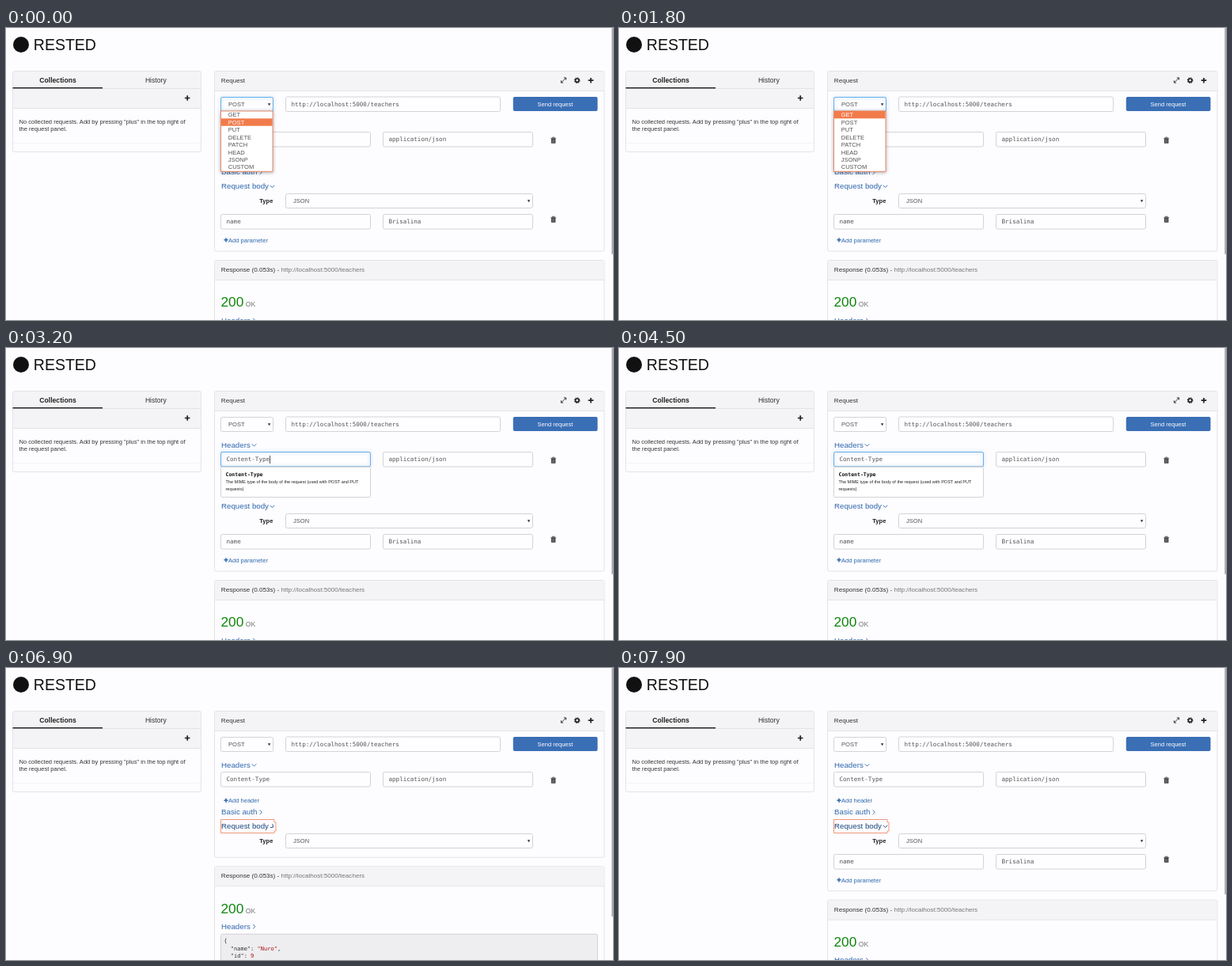
Recreate the animation shown at these times as an HTML page. Size 767x369 px, loop 8 s.

```html
<!DOCTYPE html>
<html lang="en">
<head>
<meta charset="utf-8">
<title>REST client</title>
<style>
html, body { margin: 0; width: 100%; height: 100%; overflow: hidden; background: #fdfcfe; }
svg { display: block; }
text { font-family: "Liberation Sans", Arial, sans-serif; white-space: pre; }
.mono { font-family: "DejaVu Sans Mono", monospace; }
.bold { font-weight: bold; }
.mid { text-anchor: middle; }
.glow { filter: drop-shadow(0 0 2px #66afe9aa); }
.shade { filter: drop-shadow(0 1px 2px #0005); }
</style>
</head>
<body>
<svg id="stage" width="767" height="369" viewBox="0 0 767 369"></svg>
<script>
const LOOP = 8000, SLIDE = 350, BODY = 65;
const INK = '#333', GREY = '#555', LINK = '#2f69ae', LINE = '#e4e3e6', EDGE = '#d3d2d5', HEAD = '#f4f3f5';

const text = (x, y, size, str, fill = INK, cls = '', id = '') =>
  `<text id="${id}" x="${x}" y="${y}" font-size="${size}" fill="${fill}" class="${cls}">${str}</text>`;
const rect = (x, y, w, h, fill, stroke = 'none', rx = 0, more = '') =>
  `<rect x="${x}" y="${y}" width="${w}" height="${h}" fill="${fill}" stroke="${stroke}" rx="${rx}" ${more}/>`;
const line = (d, stroke = LINE, width = 1, more = '') =>
  `<path d="${d}" fill="none" stroke="${stroke}" stroke-width="${width}" ${more}/>`;
const group = (id, inner, more = '') => `<g id="${id}" ${more}>${inner}</g>`;

const field = (x, y, w, str) =>
  rect(x, y, w, 18.5, '#fefdff', EDGE, 2) + text(x + 7, y + 11.8, 7.56, str, GREY, 'mono');
const select = (x, y, w, str) =>
  rect(x, y, w, 18, '#fefdff', EDGE, 2) + text(x + 9.5, y + 11.7, 7.56, str, GREY) +
  `<path d="M${x + w - 6.7} ${y + 7.7}h3.6l-1.8 3z" fill="#333"/>`;
const focus = (id, x, y, w, caret, more = '') =>
  group(id, rect(x, y, w, 18.5, 'none', '#66afe9', 2, 'class="glow"') +
    group(id + 'Caret', caret ? line(`M${caret} ${y + 4.5}v10`, '#222', .8) : '') + more);
const plus = (x, y, r, color, width) => line(`M${x - r} ${y}h${2 * r}M${x} ${y - r}v${2 * r}`, color, width);
const chevron = (x, y, turn = 0, id = '') =>
  line('M-2.7 -1.4L0 1.4L2.7 -1.4', LINK, .9, `id="${id}" transform="translate(${x} ${y}) rotate(${turn})"`);
const heading = (y, str, id) => text(272, y, 9.72, str, LINK, '', id);
const addLink = (y, str) => plus(278, y - 2.7, 2.6, LINK, 1.5) + text(281, y, 7.56, str, LINK);
const trash = y =>
  line(`M688.3 ${y - 2.6}h6.8M690.4 ${y - 3}v-.8h2.6v.8`, '#333', .8) +
  `<path d="M689 ${y - 1.9}h5.4v5.6h-5.4z" fill="#333"/>` +
  line(`M690.4 ${y - .9}v3.8M691.7 ${y - .9}v3.8M693 ${y - .9}v3.8`, '#bbb', .5);

const methods = ['GET', 'POST', 'PUT', 'DELETE', 'PATCH', 'HEAD', 'JSONP', 'CUSTOM'];
const optionY = i => 104.9 + i * 9.42;

const sidebar =
  rect(8.5, 54.5, 238, 102, '#fdfcfe', LINE, 2) +
  rect(9, 55, 237, 46, HEAD) +
  line('M122 76.5H246M9 101.5H246') + line('M9 145.5H246', '#f4f3f5') +
  line('M8.5 75.7H122', '#222', 1.5) +
  text(65.5, 69, 8.64, 'Collections', '#222', 'bold mid') +
  text(189.3, 69, 8.64, 'History', INK, 'mid') +
  plus(229.2, 88.5, 3.3, '#222', 1.7) +
  text(16.5, 121.4, 7.56, 'No collected requests. Add by pressing "plus" in the top right of') +
  text(16.5, 129.8, 7.56, 'the request panel.');

const request =
  rect(263.5, 54.5, 492.5, 227.5, '#fdfcfe', LINE, 2, 'id="panel"') +
  rect(264, 55, 491.5, 24, HEAD) + line('M264 79.5H756') +
  text(271.8, 68.8, 8.1, 'Request') +
  line('M701.5 69L707.5 63M704.9 62.9h2.7v2.7M701.4 66.4v2.7h2.7', '#222', .9) +
  `<circle cx="721.7" cy="66.2" r="2.2" fill="none" stroke="#222" stroke-width="1.7"/>` +
  `<circle cx="721.7" cy="66.2" r="3.3" fill="none" stroke="#222" stroke-width="1.1" stroke-dasharray="1.3 1.29"/>` +
  plus(739, 66.2, 3.3, '#222', 1.7) +
  select(271.5, 87.5, 66, 'POST') +
  field(353.5, 87, 271, 'http://localhost:5000/teachers') +
  rect(640.8, 87, 106.7, 18, '#3a6fb6', 'none', 2) +
  text(694, 98.6, 7.56, 'Send request', '#fff', 'mid') +
  heading(125.7, 'Headers') + chevron(313.5, 122.7) +
  field(271.5, 131.5, 189, 'Content-Type') +
  field(476.5, 131.5, 189, 'application/json') + trash(142) +
  addLink(170, 'Add header') +
  heading(185.4, 'Basic auth') + chevron(322, 182.3, -90) +
  heading(203.4, 'Request body', 'bodyLink') + chevron(336.5, 200.2, 0, 'bodyChevron') +
  line('', '#f2977c', 1, 'id="outline"');

const body = group('body',
  text(320.3, 220.8, 7.56, 'Type', '#222', 'bold') +
  select(353.5, 209.5, 312, 'JSON') +
  field(271.5, 235.5, 189, 'name') + field(476.5, 235.5, 189, 'Brisalina') + trash(242) +
  addLink(270.5, 'Add parameter'), 'clip-path="url(#fold)"');

const code = (y, str) => text(275.3, y, 7.02, str, INK, 'mono');
const value = str => `<tspan fill="#a11">${str}</tspan>`;
const response = group('response',
  rect(263.5, .5, 492.5, 160, '#fdfcfe', LINE, 2) +
  rect(264, 1, 491.5, 24, HEAD) + line('M264 25.5H756') +
  text(271.8, 15.2, 8.1, 'Response (0.053s) - <tspan fill="#777">http://localhost:5000/teachers</tspan>') +
  text(271.5, 59.4, 17.28, '200', '#0b870b') + text(302.7, 59.4, 8.64, 'OK', '#777') +
  heading(79.7, 'Headers') + chevron(313.5, 76.5, -90) +
  rect(271.5, 86, 476, 48, '#eeedef', EDGE, 2) +
  code(96.4, '{') + code(106.3, `  "name": ${value('"Nuro"')},`) +
  code(116.2, `  "id": ${value('9')}`) + code(126.1, '}'));

const hint = group('hint',
  rect(271.5, 150.5, 189, 38, '#fff', EDGE, 1) +
  text(277.5, 162.3, 6.5, 'Content-Type', '#111', 'mono bold') +
  text(277.5, 171.2, 5.53, 'The MIME type of the body of the request (used with POST and PUT', '#222') +
  text(277.5, 180.2, 5.53, 'requests)', '#222'));

const menu = group('menu',
  rect(271.5, 105, 65.5, 76.3, '#fff', '#e98a68', 0, 'class="shade"') +
  rect(272, 0, 64.5, 9.4, '#f27b4b', 'none', 0, 'id="hover"') +
  methods.map((m, i) => text(280.7, optionY(i) + 7.5, 7.56, m, GREY, '', 'option' + i)).join(''));

document.getElementById('stage').innerHTML =
  '<clipPath id="fold"><rect id="foldBox" x="264" y="209" width="491" height="65"/></clipPath>' +
  '<circle cx="19" cy="21" r="10" fill="#111"/>' +
  text(34.8, 28.1, 19.5, 'RESTED', '#111') +
  sidebar + request + body + response +
  focus('methodFocus', 271.5, 87.5, 66) +
  focus('urlFocus', 353.5, 87, 271, 497.3) +
  focus('headerFocus', 271.5, 131.5, 189, 333.6) +
  focus('valueFocus', 476.5, 131.5, 189, 557,
    line('M538.5 145.3' + 'q1 -1.6 2 0t2 0'.repeat(4) + 'h2', '#e33', .8)) +
  hint + menu +
  rect(765.3, 0, 1.7, 286, '#a9a8ad', 'none', .8, 'id="scroll"');

const el = id => document.getElementById(id);
const set = (id, name, v) => el(id).setAttribute(name, v);
const show = (id, on) => set(id, 'visibility', on ? 'visible' : 'hidden');

// cubic-bezier(.25, .1, .25, 1)
function ease(x) {
  if (x <= 0) return 0;
  if (x >= 1) return 1;
  const curve = (s, a, b) => 3 * s * (1 - s) ** 2 * a + 3 * s * s * (1 - s) * b + s ** 3;
  let lo = 0, hi = 1;
  for (let i = 0; i < 20; i++) {
    const m = (lo + hi) / 2;
    if (curve(m, .25, .25) < x) lo = m; else hi = m;
  }
  return curve(lo, .1, 1);
}

function draw(t) {
  const within = (a, b) => t >= a && t < b;

  show('menu', t < 2300);
  show('methodFocus', t < 2300);
  const picked = t < 1300 ? 1 : 0;
  set('hover', 'y', optionY(picked));
  methods.forEach((_, i) => set('option' + i, 'fill', i === picked ? '#fff' : GREY));

  show('urlFocus', within(2300, 2900));
  show('headerFocus', within(2900, 4900));
  show('hint', within(2900, 4900));
  show('valueFocus', within(4900, 6700));
  set('headerFocusCaret', 'opacity', t < 3700 ? 1 : 0);
  set('valueFocusCaret', 'opacity', t < 5700 ? 1 : 0);

  const closed = ease((t - 6766) / SLIDE) - ease((t - 7583) / SLIDE);
  const gone = BODY * closed;
  const ink = t >= 5900 ? '#1d4a80' : LINK;
  set('bodyLink', 'fill', ink);
  set('bodyChevron', 'stroke', ink);
  set('bodyChevron', 'transform', `translate(336.5 200.2) rotate(${-90 * closed})`);
  const bump = closed > .001 && closed < .95 ? 2 : 0;
  set('outline', 'd', `M271.5 191.5H339V195h${bump}V206h${-bump}V208.5H271.5z`);
  show('outline', t >= 6700);

  set('foldBox', 'height', BODY - gone);
  set('panel', 'height', 227.5 - gone);
  set('response', 'transform', `translate(0 ${293 - gone})`);
  set('scroll', 'height', 369 * 369 / (476 - gone));
}

function tick() {
  draw(Math.floor(performance.now() % LOOP / 100) * 100);
  requestAnimationFrame(tick);
}
tick();
</script>
</body>
</html>
```
